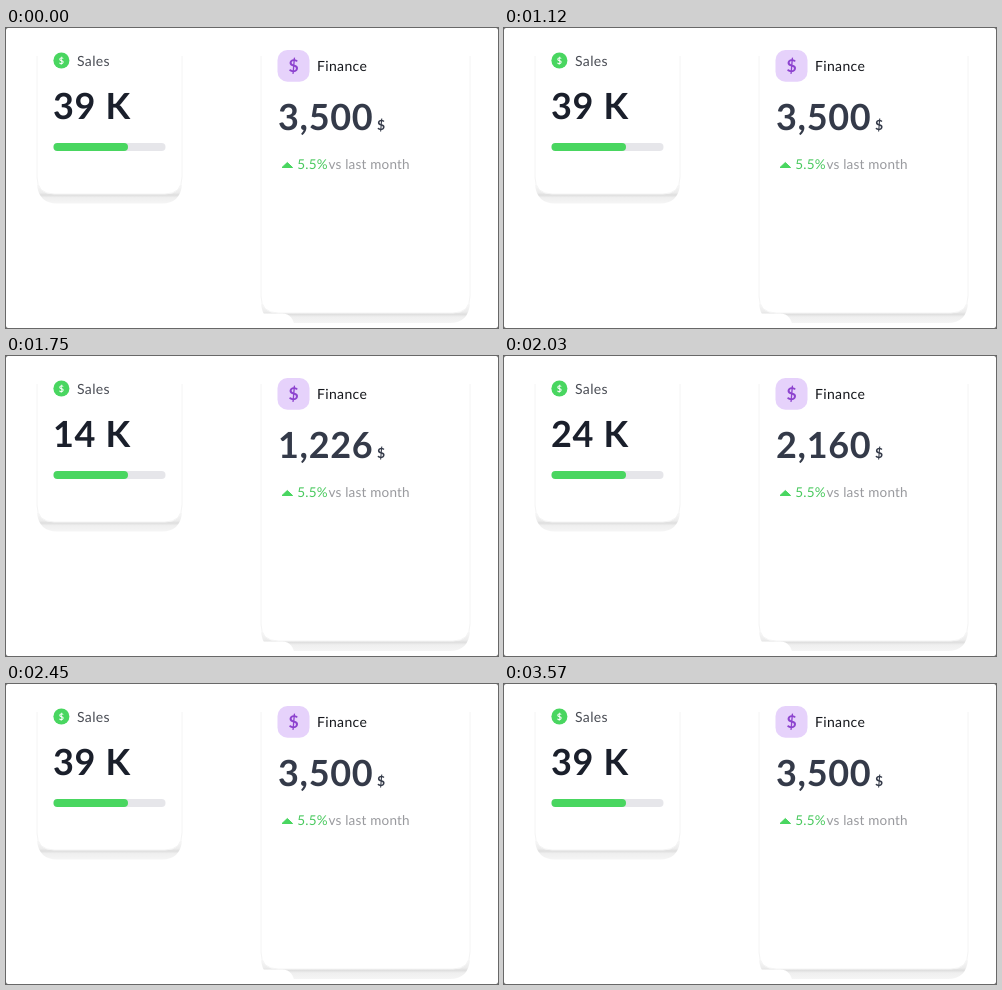
An HTML page that plays this animation: 492x300 px, repeating every 3.71 s.

```html
<!DOCTYPE html>
<html lang="en">
<head>
<meta charset="utf-8">
<title>Sales and finance</title>
<style>
  html, body { margin: 0; width: 100%; height: 100%; overflow: hidden; background: #555; }
  svg { display: block; width: 492px; height: 300px; font: 400 14px Lato, "Open Sans", sans-serif; letter-spacing: .35px; text-rendering: geometricPrecision; }
  .total { font-size: 36px; font-weight: 700; letter-spacing: .7px; }
  .unit { font-size: 14px; letter-spacing: 0; }
  .note { font-size: 13.5px; letter-spacing: .2px; }
  .edge { fill: #fff; stroke: #f4f4f4; }
  .mid { text-anchor: middle; font-weight: 700; letter-spacing: 0; }
</style>
</head>
<body>
<svg viewBox="0 0 492 300">
  <defs>
    <linearGradient id="shade" x1="0" y1="0" x2="0" y2="1">
      <stop offset="0" stop-color="#f7f7f7"/>
      <stop offset=".42" stop-color="#ececec"/>
      <stop offset=".54" stop-color="#dedede"/>
      <stop offset=".68" stop-color="#efefef"/>
      <stop offset="1" stop-color="#f5f5f5"/>
    </linearGradient>
  </defs>
  <rect width="492" height="300" rx="2" fill="#fff"/>

  <path d="M31 157Q33 175.500 51 175.500H156Q174 175.500 176 157Z" fill="url(#shade)"/>
  <path class="edge" d="M31 28V149Q31 166 48 166H159Q176 166 176 149V28"/>
  <circle cx="55.400" cy="32.500" r="8" fill="#49d660"/>
  <text class="mid" x="55.400" y="35.800" font-size="9" fill="#fff">$</text>
  <text x="71" y="37.500" fill="#4a4d55">Sales</text>
  <text class="total" x="47" y="91" fill="#1a1f2b" id="sales">39 K</text>
  <rect x="47.500" y="115" width="112" height="8" rx="4" fill="#e6e6ea"/>
  <rect x="47.500" y="115" width="74.500" height="8" rx="4" fill="#49d660"/>

  <path d="M255 276Q257 295 275 295H444Q462 295 464 276Z" fill="url(#shade)"/>
  <path class="edge" d="M255 28V268Q255 285 272 285H447Q464 285 464 268V28"/>
  <path d="M250 285.500H276Q288 286 288.500 300H250Z" fill="#fff"/>
  <rect x="271.500" y="22" width="32" height="31.800" rx="10" fill="#e6d2fb"/>
  <text class="mid" x="287.500" y="44" font-size="17.500" fill="#8d43cf">$</text>
  <text x="311" y="42.800" fill="#15171c">Finance</text>
  <text class="total" x="272" y="102" fill="#343a49"><tspan id="finance">3,500</tspan><tspan class="unit" dx="3.500">$</tspan></text>
  <path d="M276 139.500L281.300 134.500L286.600 139.500Z" fill="#49d660" stroke="#49d660" stroke-linejoin="round"/>
  <text class="note" x="291.300" y="140.800" fill="#49c95e">5.5%</text>
  <text class="note" x="322.500" y="140.800" fill="#999a9e">vs last month</text>
</svg>
<script>
  const LOOP = 3710, STEP = 70, RESET = 1470, DONE = 2450;
  const GOAL = 3500, RATE = 3.336, START = 1382.5;
  const sales = document.getElementById('sales');
  const finance = document.getElementById('finance');

  function amount(ms) {
    const t = Math.floor(ms / STEP) * STEP;
    if (t < RESET || t >= DONE) return GOAL;
    if (t === RESET) return 0;
    return Math.min(GOAL, Math.round((t - START) * RATE));
  }

  let shown = GOAL;
  const origin = performance.now();
  function draw(now) {
    const value = amount(Math.max(0, now - origin) % LOOP);
    if (value !== shown) {
      shown = value;
      sales.textContent = Math.round(value / GOAL * 39) + ' K';
      finance.textContent = value.toLocaleString('en-US');
    }
    requestAnimationFrame(draw);
  }
  requestAnimationFrame(draw);
</script>
</body>
</html>
```
